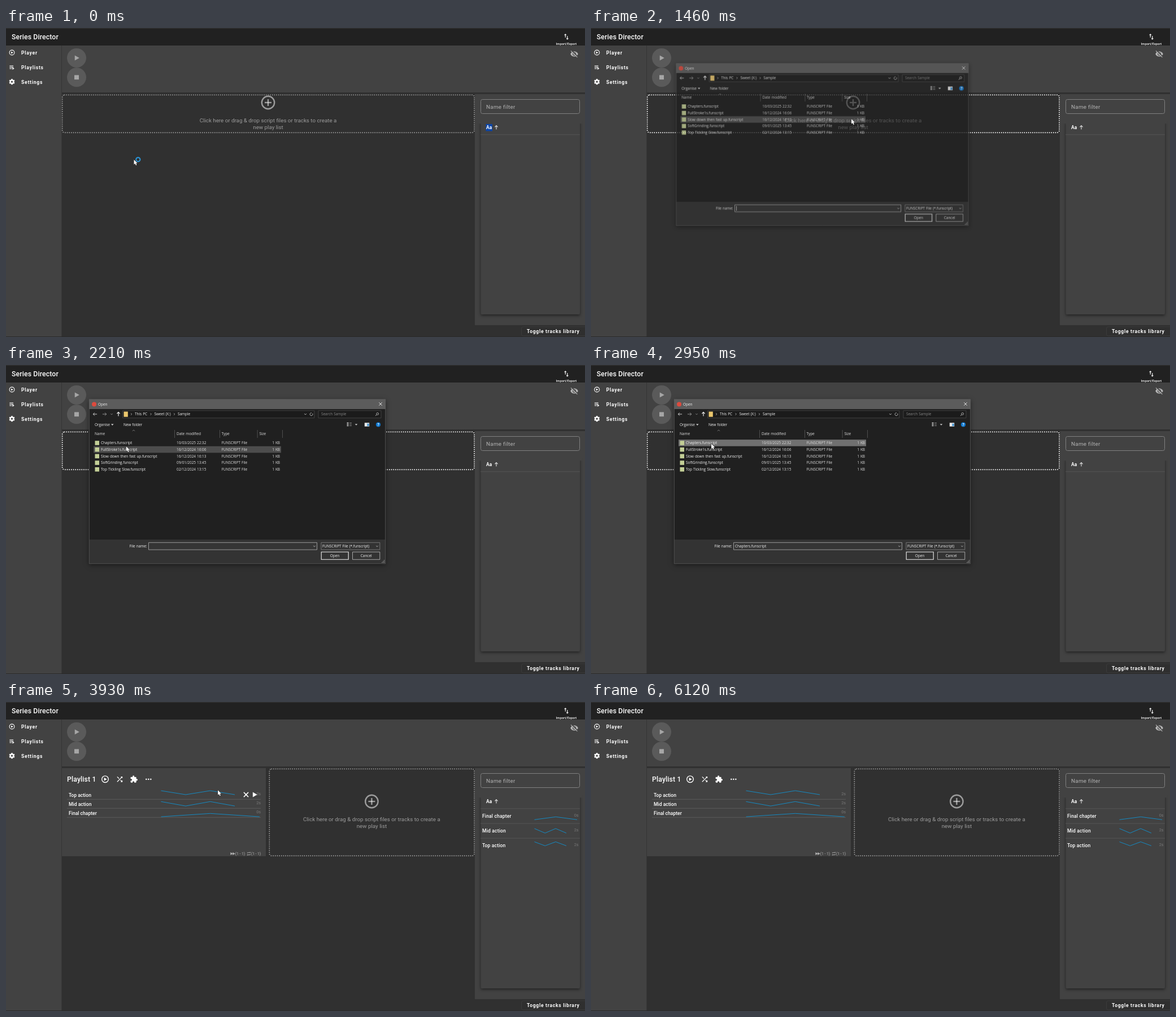
These frames come from a looping animation (1025 by 547 pixels, 6.35 s). An HTML page with a canvas:

```html
<!DOCTYPE html>
<html lang="en">
<head>
<meta charset="utf-8">
<title>Playlist editor</title>
<style>
html, body { margin: 0; width: 100%; height: 100%; overflow: hidden; background: #303030; }
canvas { display: block; width: 1025px; height: 547px; }
</style>
</head>
<body>
<canvas id="stage"></canvas>
<script>
const W = 1025, H = 547, LOOP = 6350;
const dpr = window.devicePixelRatio || 1;
const UI = 'Roboto, sans-serif';
const SYS = '"Open Sans", "Noto Sans", sans-serif';
const BLUE = '#158ac2';

function setup(canvas) {
  canvas.width = W * dpr;
  canvas.height = H * dpr;
  const c = canvas.getContext('2d');
  c.scale(dpr, dpr);
  return c;
}
const stage = setup(document.getElementById('stage'));
const layer = document.createElement('canvas');
const dialogCtx = setup(layer);
let g = stage;

// Screen updates come in bursts: [first, last, count]
const bursts = [[70, 390, 5], [880, 960, 2], [1370, 2000, 9], [2070, 2470, 6], [2710, 3270, 8],
  [3760, 4310, 8], [4400, 5030, 9], [5100, 5730, 9], [5800, 6120, 5]];

const pointerKeys = [[0, 226.5, 233], [390, 459, 161], [800, 459, 161], [880, 461, 161], [1530, 461, 161],
  [2000, 290, 166], [2140, 212.7, 144], [2310, 212.7, 144], [2390, 213, 139.5], [3680, 213, 139.5],
  [3910, 375, 156], [3990, 375, 156], [4310, 296, 202], [4390, 296, 202], [4620, 430, 310],
  [4800, 700, 330], [5030, 985, 258], [5330, 998.5, 247], [5420, 998.5, 247], [5730, 774, 320],
  [5960, 520, 200], [6040, 316, 64]];
const fadeKeys = [[1369, 0], [1370, .3], [1449, .77], [1527, 1], [3030, 1], [3110, .55], [3190, .09], [3200, 0]];
const scaleKeys = [[1370, .95], [1449, .987], [1527, 1], [3030, 1], [3190, .957]];

function snap(t) {
  let s = 0;
  for (const [a, b, n] of bursts) {
    if (t < a) break;
    const gap = (b - a) / (n - 1);
    s = a + Math.min(n - 1, Math.floor((t - a) / gap + .001)) * gap;
  }
  return s;
}

function tween(keys, t) {
  if (t <= keys[0][0]) return keys[0].slice(1);
  for (let i = 1; i < keys.length; i++) {
    const a = keys[i - 1], b = keys[i];
    if (t <= b[0]) {
      const p = (t - a[0]) / (b[0] - a[0]);
      return a.slice(1).map((v, j) => v + (b[j + 1] - v) * p);
    }
  }
  return keys[keys.length - 1].slice(1);
}

function rect(x, y, x2, y2, fill) {
  g.fillStyle = fill;
  g.fillRect(x, y, x2 - x, y2 - y);
}
function box(x, y, x2, y2, r, stroke, fill, width = 1) {
  g.beginPath();
  g.roundRect(x, y, x2 - x, y2 - y, r);
  if (fill) { g.fillStyle = fill; g.fill(); }
  if (stroke) { g.strokeStyle = stroke; g.lineWidth = width; g.stroke(); }
}
function line(points, color, width = 1) {
  g.beginPath();
  points.forEach(([x, y]) => g.lineTo(x, y));
  g.strokeStyle = color;
  g.lineWidth = width;
  g.stroke();
}
function shape(points, color) {
  g.beginPath();
  points.forEach(([x, y]) => g.lineTo(x, y));
  g.fillStyle = color;
  g.fill();
}
function disc(x, y, r, fill, stroke, width) {
  g.beginPath();
  g.arc(x, y, r, 0, 7);
  if (fill) { g.fillStyle = fill; g.fill(); }
  if (stroke) { g.strokeStyle = stroke; g.lineWidth = width; g.stroke(); }
}
function text(s, x, y, size, color, { weight = 400, gap = 0, word = 0, align = 'left', font = UI } = {}) {
  g.font = `${weight} ${size}px ${font}`;
  g.letterSpacing = gap + 'px';
  g.wordSpacing = word + 'px';
  g.textAlign = align;
  g.fillStyle = color;
  g.fillText(s, x, y);
}
function icon(path, x, y, size, color) {
  g.save();
  g.translate(x, y);
  g.scale(size / 24, size / 24);
  g.translate(-12, -12);
  g.fillStyle = color;
  g.fill(new Path2D(path));
  g.restore();
}
const chevron = (x, y, r, color, dir = 1) =>
  line([[x - r, y - r / 2 * dir], [x, y + r / 2 * dir], [x + r, y - r / 2 * dir]], color, .8);
const play = (x, y, r, color) => shape([[x - r * .75, y - r], [x + r, y], [x - r * .75, y + r]], color);
function cross(x, y, r, color, width) {
  line([[x - r, y - r], [x + r, y + r]], color, width);
  line([[x + r, y - r], [x - r, y + r]], color, width);
}
function arrow(x, y, angle, len, color, width = 1) {
  g.save();
  g.translate(x, y);
  g.rotate(angle);
  line([[-len, 0], [len, 0]], color, width);
  line([[len - 2.6, -2.6], [len, 0], [len - 2.6, 2.6]], color, width);
  g.restore();
}

const SWAP = 'M16 17V10h-2v7h-3l4 4 4-4zM9 3L5 7h3v7h2V7h3z';
const SHUFFLE = 'M10.6 9.2L5.4 4 4 5.4l5.2 5.2zM14.5 4l2 2L4 18.6 5.4 20 18 7.5l2 2V4zm.3 9.4l-1.4 1.4 3.1 3.1-2 2.1H20v-5.5l-2 2z';
const PUZZLE = 'M20.5 11H19V7c0-1.1-.9-2-2-2h-4V3.5a2.5 2.5 0 0 0-5 0V5H4c-1.1 0-2 .9-2 2v3.8h1.5a2.7 2.7 0 0 1 0 5.4H2V20c0 1.1.9 2 2 2h3.8v-1.5a2.7 2.7 0 0 1 5.4 0V22H17c1.1 0 2-.9 2-2v-4h1.5a2.5 2.5 0 0 0 0-5z';
const REPEAT = 'M7 7h10v3l4-4-4-4v3H5v6h2zM17 17H7v-3l-4 4 4 4v-3h12v-6h-2z';
const EYE = 'M1 12C4 2 20 2 23 12 20 22 4 22 1 12z';

function gear(x, y, color) {
  for (let i = 0; i < 6; i++) {
    const a = i * Math.PI / 3 + Math.PI / 6;
    line([[x, y], [x + Math.cos(a) * 5, y + Math.sin(a) * 5]], color, 2.8);
  }
  disc(x, y, 3.7, color);
  disc(x, y, 1.6, '#424242');
}
function eyeOff(x, y) {
  icon(EYE, x, y, 14.7, '#b4b4b4');
  disc(x, y, 2.4, null, '#424242', 1.1);
  line([[x - 5, y - 6.6], [x + 6.6, y + 5]], '#424242', 1.5);
  line([[x - 6, y - 5.6], [x + 5.4, y + 5.8]], '#b4b4b4', 1.2);
}

function chrome() {
  rect(0, 0, W, H, '#303030');
  rect(0, 0, W, 31, '#212121');
  rect(0, 0, W, 1, '#333');
  rect(0, 31, 98, H, '#424242');
  rect(99, 31, W, 114, '#424242');
  rect(98, 31, 99, H, '#363636');
  text('Series Director', 10, 20, 12.23, '#fff', { weight: 500, gap: .15 });
  icon(SWAP, 992, 15.5, 14, '#fff');
  text('Import/Export', 992, 29.8, 5.8, '#fff', { weight: 500, align: 'center' });

  ['Player', 'Playlists', 'Settings'].forEach((s, i) =>
    text(s, 27, 47.3 + i * 25.7, 8.56, '#fff', { weight: 700, gap: .764 }));
  disc(10.5, 43.5, 4.4, null, '#fff', 1.1);
  play(10.7, 43.5, 2.1, '#fff');
  [66.5, 68.9, 71.3].forEach((y, i) => rect(6.3, y, i < 2 ? 13 : 10.3, y + 1.1, '#fff'));
  play(12.9, 71.7, 2, '#fff');
  gear(10.5, 95.2, '#fff');

  disc(125, 53, 17, '#5a5a5a');
  disc(125, 87.3, 17, '#5a5a5a');
  play(125.2, 53, 4.6, '#a6a6a6');
  rect(121, 83.4, 129, 91.2, '#a6a6a6');
  eyeOff(1006, 46);
}

function zone(x, x2, y2, cx, cy, hover) {
  g.save();
  g.globalAlpha = hover ? 1 : .52;
  g.setLineDash([.01, 3.67]);
  g.lineCap = 'round';
  box(x, 118.4, x2, y2, 4, '#fff', null, 1.9);
  g.setLineDash([]);
  g.lineCap = 'butt';
  disc(cx, cy, 11.2, null, '#fff', 2.4);
  line([[cx - 6, cy], [cx + 6, cy]], '#fff', 2.4);
  line([[cx, cy - 6], [cx, cy + 6]], '#fff', 2.4);
  text('Click here or drag & drop script files or tracks to create a', cx, cy + 35.2, 9.78, '#fff', { align: 'center' });
  text('new play list', cx, cy + 46.9, 9.78, '#fff', { align: 'center' });
  g.restore();
}

// Zigzag starting at the high point, or a single low bump
const zigzag = (x, y, dx, dy) => line([[x, y], [x + dx, y + dy], [x + 2 * dx, y], [x + 3 * dx, y + dy]], BLUE);
const bump = (x, y, dx, dy) => line([[x, y + dy], [x + 2 * dx, y], [x + 4 * dx, y + dy]], BLUE);

function playlist([px, py]) {
  rect(99, 117, 460, 273, '#424242');
  text('Playlist 1', 108, 140.7, 12.23, '#fff', { weight: 500, gap: .15 });
  disc(175.5, 136.7, 5.8, null, '#fff', 1.4);
  play(175.8, 136.7, 2.9, '#fff');
  icon(SHUFFLE, 201.3, 136.8, 14.7, '#fff');
  icon(PUZZLE, 226.5, 136.8, 14.2, '#fff');
  [248.3, 252.3, 256.3].forEach(x => disc(x, 136.8, 1.25, '#fff'));

  ['Top action', 'Mid action', 'Final chapter'].forEach((s, i) => {
    const y = 167.5 + i * 16;
    text(s, 111, y, 8.56, '#fff', { weight: 500 });
    text(i < 2 ? '2s' : '0s', 451, y - 2.3, 7.3, '#777', { align: 'right' });
    rect(108, y + 4.3, 451, y + 5.1, '#606060');
  });
  zigzag(274.5, 157, 43.5, 7);
  zigzag(274.5, 176.3, 43.5, 7.8);
  bump(274.5, 197.3, 43.6, 5.8);

  const row = Math.floor((py - 156) / 16);
  if (px > 108 && px < 451 && row >= 0 && row < 3) {
    const y = 164 + row * 16;
    cross(425, y, 4.1, '#fff', 1.5);
    play(440.2, y, 4.4, '#fff');
  }
  play(399.3, 268.5, 2.6, '#b0b0b0');
  play(403.2, 268.5, 2.6, '#b0b0b0');
  text('(1 - 1)', 405.7, 271, 6.7, '#b0b0b0');
  icon(REPEAT, 430, 268.5, 8.6, '#b0b0b0');
  text('(1 - 1)', 433.9, 271, 6.7, '#b0b0b0');
}

function library(t, filled, [px, py]) {
  rect(830, 117, W, 526, '#424242');
  g.save();
  g.shadowColor = 'rgba(0,0,0,.5)';
  g.shadowBlur = 5 * dpr;
  g.shadowOffsetY = 2 * dpr;
  box(840.5, 165, 1016, 507, 2, null, '#424242');
  g.restore();
  rect(836, 153, 1020, 169, '#424242');
  box(840.5, 126.5, 1015.5, 151.5, 3, '#808080');
  text('Name filter', 850, 143.4, 9.78, '#b5b5b5', { gap: .31 });
  if (t < 880) rect(849.5, 170, 861, 182.5, '#0b45a8');
  text('Aa', 850, 179.2, 8.4, '#fff', { weight: 700 });
  arrow(868, 176.2, -Math.PI / 2, 3.4, '#e4e4e4', 1.1);
  rect(840, 188.4, 1016, 189.2, '#595959');

  if (filled) {
    const over = px > 840 && px < 1016 && py > 241 && py < 267;
    ['Final chapter', 'Mid action', 'Top action'].forEach((s, i) => {
      const y = 205 + i * 26.2;
      text(s, 843, y, 8.56, '#fff', { weight: 500, gap: .15 });
      if (i < 2 || !over) text(i ? '2s' : '0s', 1013.5, y - 2, 7.3, '#777', { align: 'right' });
      if (i < 2) rect(840, y + 9.6, 1016, y + 10.4, '#595959');
    });
    bump(935.5, 203.3, 18.9, 5);
    zigzag(935.5, 224, 18.8, 8);
    zigzag(935.5, 247.5, 18.8, 7);
    if (over) cross(1005, 254.3, 3.9, '#fff', 1.5);
  }
  if (t >= 4950 && t < 5800)
    text('Drag and drop tracks from here to a playlist.', 840, 514.6, 7.33, '#bdbdbd', { gap: .244 });
  box(912.5, 529, W + 4, 545, 3, '#3b3b3b', '#2f2f2f');
  text('Toggle tracks library', 922, 540, 8.56, '#fff', { weight: 700, gap: .72 });
  rect(0, 546, W, H, '#2a2a2a');
}

const files = [
  ['Chapters.funscript', '10/03/2025 22:32'],
  ['FullStroke1s.funscript', '16/12/2024 16:06'],
  ['Slow down then fast up.funscript', '16/12/2024 16:13'],
  ['SoftGrinding.funscript', '09/01/2025 13:45'],
  ['Top Tickling Slow.funscript', '02/12/2024 13:15']
];
function label(s, x, y, color = '#f0f0f0', align = 'left') {
  text(s, x, y, 6.5, color, { gap: -.05, word: .4, align, font: SYS });
}

function dialog(t, py) {
  g = dialogCtx;
  g.clearRect(0, 0, W, H);
  g.save();
  g.shadowColor = 'rgba(0,0,0,.5)';
  g.shadowBlur = 8 * dpr;
  g.shadowOffsetY = 2 * dpr;
  rect(147, 60.5, 672, 352, '#333');
  g.restore();
  rect(147, 60.5, 672, 78, '#5c5c5c');
  rect(147.7, 78, 671.3, 309, '#202020');
  disc(156, 69.5, 4, '#dd4b3e');
  label('Open', 163, 72);
  cross(663, 69, 2.7, '#f0f0f0', .9);

  arrow(157.7, 87, Math.PI, 3.4, '#ddd', .9);
  arrow(174.3, 87, 0, 3.4, '#a0a0a0', .9);
  chevron(187, 87, 1.7, '#a0a0a0');
  arrow(199, 87, -Math.PI / 2, 3.5, '#fff', 1.1);
  box(206.5, 80.8, 545.8, 93.8, 0, '#4b4b4b', '#1b1b1b', .8);
  box(553, 80.8, 664, 93.8, 0, '#4b4b4b', '#1b1b1b', .8);
  rect(208.5, 82.5, 215.8, 91.8, '#eac66d');
  [222, 256.5, 298].forEach(x => line([[x - .9, 85.3], [x + .8, 87], [x - .9, 88.7]], '#ccc', .8));
  label('This PC', 228, 89.4);
  label('Sweet (X:)', 262.5, 89.4);
  label('Sample', 304, 89.4);
  chevron(530, 87, 2, '#ccc');
  g.beginPath();
  g.arc(540.5, 87.2, 2.5, -.6, 4.9);
  g.strokeStyle = '#ccc';
  g.lineWidth = .8;
  g.stroke();
  label('Search Sample', 558, 89.4, '#868686');
  disc(657.7, 86.4, 1.9, null, '#ccc', .8);
  line([[656.3, 87.8], [654, 90.1]], '#ccc', .9);

  label('Organise', 157, 107.8);
  shape([[186, 104.6], [190.6, 104.6], [188.3, 107]], '#ddd');
  label('New folder', 208, 107.8);
  [102.5, 105, 107.5].forEach(y => {
    rect(603.5, y - .7, 606.5, y + .7, '#ddd');
    rect(608, y - .4, 612, y + .4, '#999');
  });
  shape([[617.7, 104.4], [622.3, 104.4], [620, 106.8]], '#ddd');
  rect(634.8, 102.3, 643.2, 108.8, '#e8e8e8');
  rect(639.5, 103.8, 642.6, 108.2, '#3a8fd0');
  disc(659, 105.5, 4.1, '#0f78d0');
  text('?', 659, 108, 6.8, '#fff', { weight: 700, align: 'center', font: SYS });

  chevron(226, 116, 2.2, '#8a8a8a', -1);
  [['Name', 157], ['Date modified', 302], ['Type', 381.5], ['Size', 448.5]].forEach(([s, x]) => label(s, x, 124.2, '#dedede'));
  [298, 378, 444.7, 489].forEach(x => rect(x, 115, x + .8, 129, '#5a5a5a'));

  const picked = t >= 2390;
  const active = picked ? 0 : Math.floor((py - 132) / 11.7);
  files.forEach(([name, date], i) => {
    const y = 140.2 + i * 11.7;
    if (i === active) rect(155, y - 8.1, 487, y + 3.5, picked ? '#707070' : '#4d4d4d');
    rect(157.5, y - 6, 165, y + 1.6, '#c3cf96');
    label(name, 168, y);
    label(date, 302, y, '#dedede');
    label('FUNSCRIPT File', 381.5, y, '#dedede');
    label('1 KB', 485, y, '#dedede', 'right');
  });

  label('File name:', 249.5, 322.8, '#f0f0f0', 'right');
  box(252.5, 314.3, 550.5, 327, 0, '#a5a5a5', '#353535', .9);
  chevron(546, 320.8, 1.8, '#ccc');
  if (picked) label('Chapters.funscript', 255, 322.8);
  else if (t < 1980) rect(255.2, 316.5, 255.9, 325, '#eee');
  box(557.9, 314.3, 661.8, 327, 0, '#7d7d7d', '#333', .9);
  label('FUNSCRIPT File (*.funscript)', 560, 322.8);
  chevron(657, 320.8, 1.8, '#ccc');
  box(558.2, 331, 606.2, 344.3, 0, '#f2f2f2', '#333', 1.1);
  box(613.5, 331, 661.8, 344.3, 0, '#b5b5b5', '#333', .9);
  label('Open', 582, 339.8, '#f0f0f0', 'center');
  label('Cancel', 637.7, 339.8, '#f0f0f0', 'center');
  for (let i = 0; i < 3; i++)
    for (let j = 0; j <= i; j++) rect(669 - j * 1.9, 345.2 + i * 1.9, 670.1 - j * 1.9, 346.3 + i * 1.9, '#a5a5a5');
  box(147.3, 60.8, 671.7, 351.7, 0, '#5c5c5c', null, .7);
  g = stage;
}

function placeDialog(t, py) {
  const [alpha] = tween(fadeKeys, t);
  if (alpha <= 0) return;
  const [k] = tween(scaleKeys, t);
  dialog(t, py);
  g.save();
  g.globalAlpha = alpha;
  g.translate(409.5, 206.3);
  g.scale(k, k);
  g.translate(-409.5, -206.3);
  g.drawImage(layer, 0, 0, W, H);
  g.restore();
}

function pointer(t, [x, y]) {
  if (t < 70 || (t > 5300 && t < 5400)) disc(x + 7.3, y - .2, 3.6, null, '#2a9ae0', 2);
  g.save();
  g.translate(x, y);
  const outline = [[0, 0], [0, 8.8], [2, 7], [3.5, 10.3], [5, 9.6], [3.6, 6.5], [6.2, 6.3], [0, 0]];
  line(outline, '#111', 1);
  shape(outline, '#fff');
  g.restore();
}

function draw(now) {
  const t = snap(now % LOOP);
  const pos = tween(pointerKeys, t);
  const filled = t >= 3265;
  const inside = (x, x2, y2) => t < 6100 && pos[0] > x && pos[0] < x2 && pos[1] > 117 && pos[1] < y2;
  chrome();
  if (filled) {
    playlist(t < 6100 ? pos : [0, 0]);
    zone(466.3, 829, 272.3, 647.4, 176, inside(465, 830, 273));
  } else {
    zone(99.7, 829, 185.2, 464, 132, inside(99, 830, 186));
  }
  library(t, filled, pos);
  placeDialog(t, pos[1]);
  if (t < 6100) pointer(t, pos);
}

const start = performance.now();
function loop() {
  draw(performance.now() - start);
  requestAnimationFrame(loop);
}
loop();
</script>
</body>
</html>
```
